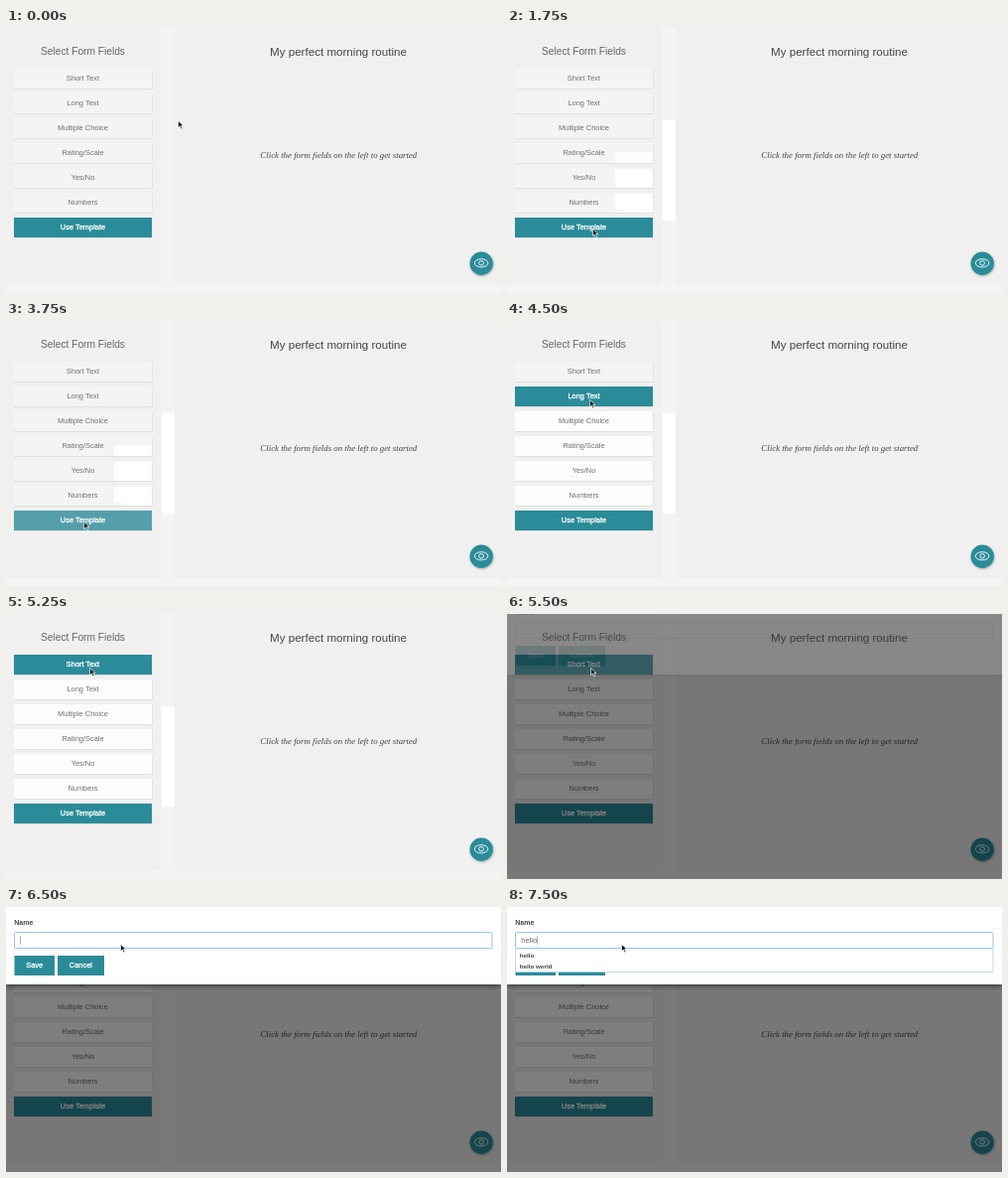
Write an HTML page that moves like this. It is 499 px wide and 267 px high and loops after 8 s.

```html
<!DOCTYPE html>
<html lang="en">
<head>
<meta charset="utf-8">
<title>Form builder</title>
<style>
  html, body { margin: 0; width: 100%; height: 100%; overflow: hidden; background: #f4f4f4; }
  svg { display: block; width: 499px; height: 267px; }
  text { font-family: "Liberation Sans", Arial, sans-serif; fill: #666; }
  .mid { text-anchor: middle; }
  .label { font-size: 7.45px; fill: #707070; }
  .on { fill: #fff; stroke: #fff; stroke-width: .3px; }
  .bold { font-weight: bold; fill: #444; }
  .hint { font: italic 8.82px "Liberation Serif", "Times New Roman", serif; fill: #444; }
  .teal { fill: #2b8c99; }
</style>
</head>
<body>
<svg viewBox="0 0 499 267">
  <defs>
    <filter id="soft" x="-20%" y="-20%" width="150%" height="150%">
      <feDropShadow dx=".6" dy="1" stdDeviation="1" flood-opacity=".3"/>
    </filter>
    <filter id="deep" x="-5%" y="-10%" width="110%" height="130%">
      <feDropShadow dx="0" dy="2" stdDeviation="2.5" flood-opacity=".5"/>
    </filter>
  </defs>

  <rect width="499" height="267" fill="#f4f4f4"/>
  <rect x="-5" y="-5" width="161" height="264" rx="3" fill="#f0f0f0"/>
  <rect x="170" y="-5" width="335" height="264" rx="3" fill="#f0f0f0"/>
  <rect id="strip" x="157" y="93" width="13" fill="#fff"/>
  <text class="mid" x="77.5" y="26.8" font-size="10.2">Select Form Fields</text>
  <text class="mid" x="335" y="28" font-size="11.6" style="fill:#444">My perfect morning routine</text>
  <text class="mid hint" x="335.3" y="131">Click the form fields on the left to get started</text>
  <g id="fields"></g>
  <path id="patch" fill="#fff" d="M109 125.5h38v10.5h-38zM109 142h38v19h-38zM109 167h38v19h-30v-3h-8z"/>
  <circle class="teal" cx="479.2" cy="237.3" r="11.7" filter="url(#soft)"/>
  <g fill="none" stroke="#fff" stroke-width=".9">
    <ellipse cx="479.1" cy="236.8" rx="6.8" ry="4.1"/>
    <circle cx="479.1" cy="236.8" r="2.3"/>
  </g>

  <rect id="shade" width="499" height="267"/>

  <g id="modal">
    <rect y="-40" width="499" height="118" fill="#fff" filter="url(#deep)"/>
    <text class="bold" x="8.3" y="18" font-size="7">Name</text>
    <rect id="input" x="8.5" y="25.5" width="481.5" height="16" rx="1" fill="#fff"/>
    <text id="typed" x="14.2" y="36" font-size="7.6"></text>
    <path id="caret" stroke="#999" stroke-width=".8"/>
    <rect class="teal" x="8.5" y="49" width="40.5" height="20"/>
    <rect id="cancel" x="52" y="49" width="47" height="20"/>
    <text class="mid label on" x="28.7" y="61.3">Save</text>
    <text class="mid label on" x="75.4" y="61.3">Cancel</text>
    <g id="list">
      <rect x="8.5" y="42" width="481.5" height="23.5" fill="#fff" stroke="#b5d3e4" stroke-width=".8"/>
      <text class="bold" x="12.8" y="50.8" font-size="6.2">hello</text>
      <text class="bold" x="12.8" y="62" font-size="6.2">hello world</text>
    </g>
  </g>

  <path id="mouse" d="M-.4-.6v7.2l1.7-1.5 1.3 2.9 1.3-.6-1.3-2.8h2.3z" fill="#111" stroke="#fff" stroke-width=".7"/>
</svg>

<script>
const LOOP = 8000, TEAL = "#2b8c99", LIGHT = "#549fab";
const $ = id => document.getElementById(id);
const set = (el, attrs) => { for (const k in attrs) el.setAttribute(k, attrs[k]); };
const show = (id, on) => set($(id), { visibility: on ? "visible" : "hidden" });
const held = (steps, t) => steps.findLast(s => s[0] <= t);

// Each row: start time, then the values held until the next row.
const mousePath = [
  [0, 174, 94], [250, 154, 118], [750, 179, 150], [1000, 165, 180], [1250, 130, 178],
  [1500, 106, 192], [1750, 87, 203], [2000, 82, 203], [2500, 80, 203], [3750, 79, 203],
  [4000, 80, 177], [4250, 82, 128], [4500, 84, 80], [4750, 85, 55],
  [6250, 116, 38]
];
const hovers = [[0, -1], [2500, 6], [4000, 5], [4250, 3], [4500, 1], [4750, 0]];
const stripHeights = [[0, 0], [250, 33], [750, 70], [1000, 101], [5500, 0]];
// shade opacity, modal offset, modal opacity
const modalSteps = [[0, 0, -79, 0], [5500, .5, -17, .12], [5750, .5, -4, .8], [6000, .5, 0, 1]];
const typing = [[0, ""], [7000, "h"], [7250, "hell"], [7500, "hello"]];
const whiteFrom = [4750, 4500, 4500, 4250, 4250, 4000];

const names = ["Short Text", "Long Text", "Multiple Choice", "Rating/Scale", "Yes/No", "Numbers", "Use Template"];
$("fields").innerHTML = names.map((name, i) => {
  const y = 41 + i * 25;
  return `<rect x="8.3" y="${y + .7}" width="139.2" height="20" opacity=".1"/>
    <rect class="box" x="8" y="${y}" width="139" height="20"/>
    <text class="mid label" x="77.5" y="${y + 12.3}">${name}</text>`;
}).join("");
const boxes = [...$("fields").querySelectorAll(".box")];
const labels = [...$("fields").querySelectorAll("text")];

function draw(t) {
  const [, x, y] = held(mousePath, t);
  set($("mouse"), { transform: `translate(${x} ${y})` });

  const hover = held(hovers, t)[1];
  boxes.forEach((box, i) => {
    const last = i === 6, on = last || i === hover;
    const idle = t >= whiteFrom[i] ? "#fdfdfd" : "#f4f4f4";
    set(box, { fill: !on ? idle : last && i === hover ? LIGHT : TEAL });
    labels[i].classList.toggle("on", on);
  });
  set($("strip"), { height: held(stripHeights, t)[1] });
  show("patch", t >= 1250 && t < 4250);

  const [, shade, drop, alpha] = held(modalSteps, t);
  set($("shade"), { opacity: shade });
  set($("modal"), { transform: `translate(0 ${drop})`, opacity: alpha });

  const focus = t >= 6500, word = held(typing, t)[1];
  set($("input"), { stroke: focus ? "#94c8ea" : "#ccc" });
  set($("cancel"), { fill: t < 6250 ? LIGHT : TEAL });
  $("typed").textContent = word;
  const end = 14.6 + (word ? $("typed").getComputedTextLength() : 0);
  set($("caret"), { d: `M${end} 29.2v8.6` });
  show("caret", focus);
  show("list", word);
}

function tick() {
  draw(performance.now() % LOOP);
  requestAnimationFrame(tick);
}
tick();
</script>
</body>
</html>
```
